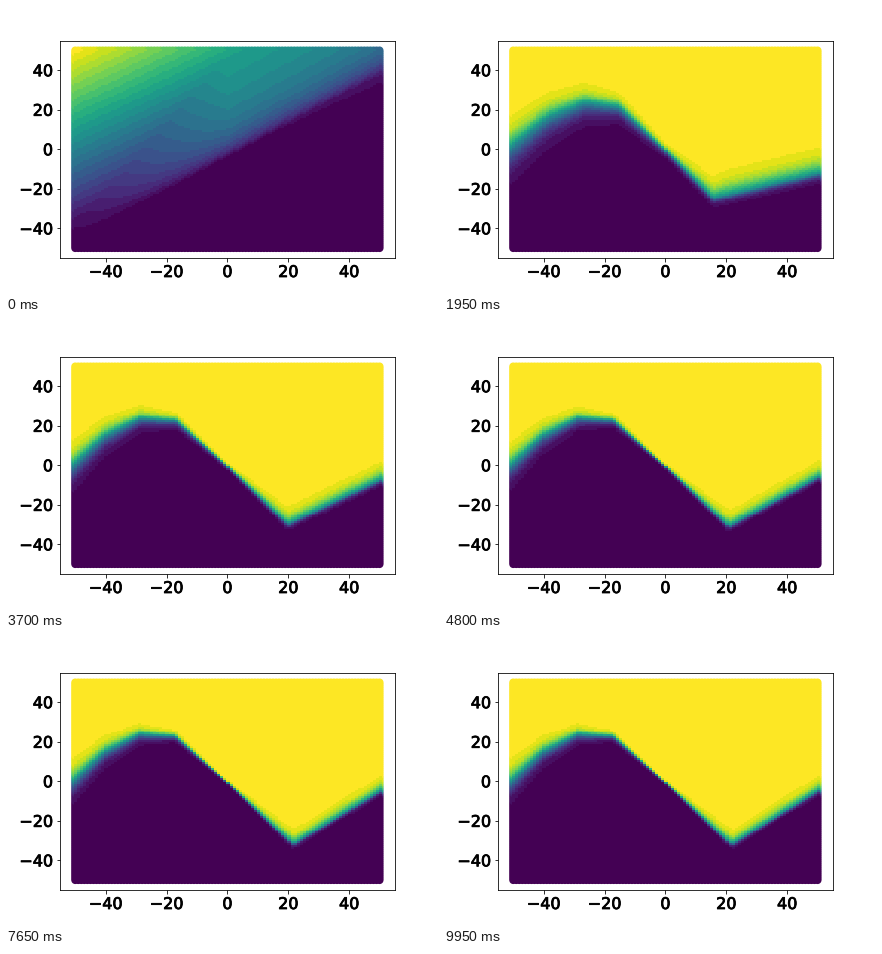
Recreate the animation shown at these times as a matplotlib script. Size 432 by 288 pixels, loop 10 s.

```python
import numpy as np
import matplotlib.pyplot as plt
from matplotlib.animation import FuncAnimation
from matplotlib.patheffects import withStroke

FRAMES, STEP = 200, 50
LEVELS = 24       # visible colour bands
WARMUP = 0.85     # seconds until the ramp has become a boundary

# Bends of the decision boundary, (x, y): after warm-up and once settled.
EARLY = np.array([(-50, 20), (-30, 22), (-20, 23), (-12, 18.5),
                  (0, -1), (9, -16.5), (50, -19)])
SETTLED = np.array([(-50, 1), (-40, 15), (-29, 23.5), (-17.5, 22.5),
                    (0, -1), (21.5, -32), (50, -4.5)])
# The left bends settle sooner than the right ones.
SETTLE_TIME = np.linspace(0.4, 1.7, len(EARLY))[:, None]

grid = np.arange(-50, 51)
gx, gy = np.meshgrid(grid, grid)


def untrained_field():
    """A tilted plane plus a ridge that rises quickly on the right."""
    plane = (gy + 40 - 0.72 * (gx + 50)) / 90
    above = np.maximum(gy - 0.82 * gx + 4, 0)
    jump = 0.36 * np.clip((gx + 50) / 50, 0, 1)
    ridge = jump * (1 - np.exp(-above / 8)) + 0.004 * above
    return np.clip(np.maximum(plane, ridge), 0, 1)


def trained_field(age):
    bends = SETTLED + (EARLY - SETTLED) * np.exp(-age / SETTLE_TIME)
    dist = gy - np.interp(grid, bends[:, 0], bends[:, 1])

    # Soft at the left and right ends, sharp in the middle.
    blur = np.exp(-age / 1.4)
    core = 0.3 + 1.5 * blur
    left = np.clip(-grid / 50, 0, 1) ** (1.5 - 1.2 * blur)
    right = np.clip(grid / 20, 0, 1)
    below = core + (2.6 + 3 * blur) * left + 0.4 * right
    above = core + (2.6 + blur) * left + (1.6 + 1.6 * blur) * right
    return 0.5 + 0.5 * np.tanh(dist / (2 * np.where(dist < 0, below, above)))


def field(frame):
    t = frame * STEP / 1000
    fade = max(0, 1 - t / WARMUP) ** 2
    trained = trained_field(max(0, t - WARMUP))
    values = fade * untrained_field() + (1 - fade) * trained
    return np.round(values * LEVELS) / LEVELS


fig = plt.figure(figsize=(6, 4), dpi=72, facecolor="white")
ax = fig.add_axes([0.125, 0.125, 0.775, 0.755])
style = dict(cmap="viridis", vmin=0, vmax=1)

# Round markers on the rim give the block its scalloped edge.
rim = np.maximum(abs(gx), abs(gy)) == 50
start = field(0)
dots = ax.scatter(gx[rim], gy[rim], c=start[rim], s=36, linewidths=1.9,
                  zorder=1, **style)
image = ax.imshow(start, origin="lower", extent=(-50.5, 50.5, -50.5, 50.5),
                  aspect="auto", interpolation="nearest", zorder=1.5, **style)

ax.set(xlim=(-55, 55), ylim=(-55, 55))
ticks = range(-40, 41, 20)
ax.set_xticks(ticks)
ax.set_yticks(ticks)
for label in ax.get_xticklabels() + ax.get_yticklabels():
    label.set(fontfamily="DejaVu Sans", fontsize=16,
              path_effects=[withStroke(linewidth=0.8, foreground="black")])


def update(frame):
    values = field(frame)
    image.set_data(values)
    dots.set_array(values[rim])
    return image, dots


anim = FuncAnimation(fig, update, frames=FRAMES, interval=STEP,
                     repeat=True, repeat_delay=0)
plt.show()
```
